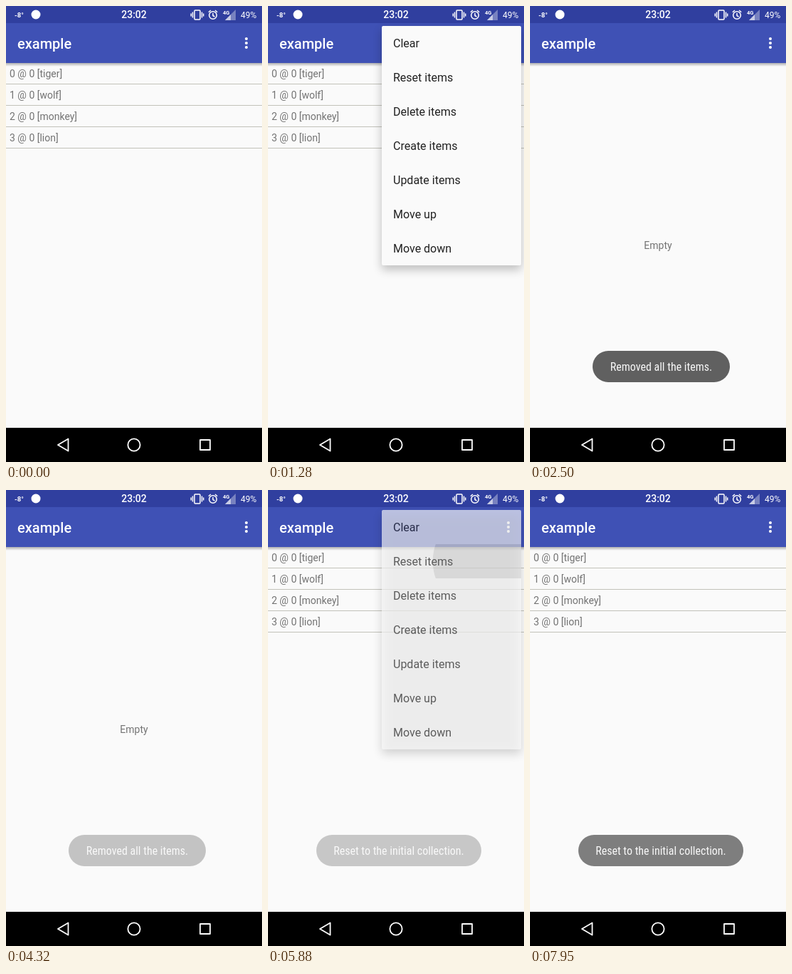
Write an HTML page that moves like this. It is 360 px wide and 640 px high and loops after 7.99 s.

```html
<!DOCTYPE html>
<html lang="en">
<head>
<meta charset="utf-8">
<title>List menu demo</title>
<style>
html, body { margin: 0; width: 100%; height: 100%; overflow: hidden; background: #000; }
#stage { display: block; width: 100%; height: 100%; }
text { font-family: Roboto, sans-serif; }
.toast text { font: 16px "Roboto Condensed", Roboto, sans-serif; text-anchor: middle; fill: #f8f8f8; }
</style>
</head>
<body>
<svg id="stage" viewBox="0 0 360 640">
  <defs>
    <filter id="soft" filterUnits="userSpaceOnUse" x="120" y="0" width="240" height="420">
      <feGaussianBlur stdDeviation="7"/>
    </filter>
    <linearGradient id="edge" x1="0" y1="0" x2="0" y2="1">
      <stop offset="0" stop-opacity=".3"/>
      <stop offset="1" stop-opacity="0"/>
    </linearGradient>
    <clipPath id="reveal"><rect id="window" rx="2"/></clipPath>
  </defs>

  <rect width="360" height="640" fill="#fafafa"/>
  <g id="list" font-size="14" fill="#737373"></g>
  <text id="empty" x="180" y="341" font-size="14" text-anchor="middle" fill="#737373">Empty</text>

  <rect y="80" width="360" height="5" fill="url(#edge)"/>
  <rect y="24" width="360" height="56" fill="#3f51b5"/>
  <text x="16" y="60" font-size="20" font-weight="500" fill="#fff">example</text>
  <circle id="press" cx="338" cy="52" fill="#fff"/>
  <g fill="#fff">
    <circle cx="338" cy="46" r="2"/><circle cx="338" cy="52" r="2"/><circle cx="338" cy="58" r="2"/>
  </g>

  <rect width="360" height="24" fill="#303f9f"/>
  <g fill="#fff">
    <text x="12" y="16" font-size="9.5" font-weight="700">-8°</text>
    <circle cx="42" cy="12" r="6.5"/>
    <text x="180" y="17" font-size="14" font-weight="500" text-anchor="middle">23:02</text>
    <text x="305" y="12" font-size="7.5" font-weight="700">4G</text>
    <text x="330" y="17" font-size="12">49%</text>
    <path d="M308 20L323 5V20Z" fill-opacity=".35"/>
    <path d="M308 20L316 12V20Z" fill-opacity=".6"/>
  </g>
  <g fill="none" stroke="#fff" stroke-width="1.5">
    <rect x="265" y="6" width="8" height="13" rx="1"/>
    <path d="M262.5 8.5V16.5M260.3 10.5V14.5M275.5 8.5V16.5M277.7 10.5V14.5"/>
    <circle cx="291" cy="13" r="5.3"/>
    <path d="M291 10V13.5L293.5 15M284.8 8.7L288 6M297.2 8.7L294 6"/>
  </g>

  <g id="toasts"></g>

  <rect id="shadow" filter="url(#soft)"/>
  <g id="menu" clip-path="url(#reveal)">
    <g id="content">
      <rect x="160" y="28" width="196" height="336" fill="#fafafa"/>
      <svg id="row" x="160" width="196" height="48"><circle id="ripple" cy="24"/></svg>
      <g id="items" font-size="16" fill="#212121"></g>
    </g>
  </g>

  <rect y="592" width="360" height="48"/>
  <g fill="none" stroke="#fff" stroke-width="1.8" stroke-linejoin="round">
    <path d="M87.5 607.5V624.5L73 616Z"/>
    <circle cx="180" cy="616" r="8.6"/>
    <rect x="273" y="609" width="14" height="14"/>
  </g>
</svg>
<script>
const LOOP = 7990;
const BUTTON = { x: 320, y: 34, width: 36, height: 36 };
const PANEL = { x: 160, y: 28, width: 196, height: 336 };

const $ = id => document.getElementById(id);
const set = (id, attrs) => {
  for (const name in attrs) $(id).setAttribute(name, attrs[name]);
};
const show = (id, opacity) => set(id, { opacity, visibility: opacity > 0 ? "visible" : "hidden" });
const mix = (a, b, p) => a + (b - a) * p;
const progress = (t, start, length) => Math.max(0, Math.min(1, (t - start) / length));
const easeOut = p => 1 - (1 - p) ** 2;

// Material standard curve: cubic-bezier(.4, 0, .2, 1).
function standard(p) {
  let low = 0, high = 1, s = p;
  for (let i = 0; i < 16; i++) {
    s = (low + high) / 2;
    const x = 1.2 * s * (1 - s) ** 2 + 0.6 * s * s * (1 - s) + s ** 3;
    if (x < p) low = s; else high = s;
  }
  return p >= 1 ? 1 : 3 * s * s * (1 - s) + s ** 3;
}

$("list").innerHTML = ["tiger", "wolf", "monkey", "lion"].map((name, i) =>
  `<text x="5" y="${100 + 30 * i}">${i} @ 0 [${name}]</text>
   <rect y="${109 + 30 * i}" width="360" height="1" fill="#c2c2ba"/>`).join("");

$("items").innerHTML =
  ["Clear", "Reset items", "Delete items", "Create items", "Update items", "Move up", "Move down"]
    .map((label, i) => `<text x="176" y="${58 + 48 * i}">${label}</text>`).join("");

const toasts = [
  { id: "removed", label: "Removed all the items.", x: 88, width: 193, from: 1990, to: 3870, fade: 560 },
  { id: "reset", label: "Reset to the initial collection.", x: 68, width: 232, from: 5790, to: 7715, fade: 530 }
];
$("toasts").innerHTML = toasts.map(({ id, label, x, width }) =>
  `<g id="${id}" class="toast"><rect x="${x}" y="484" width="${width}" height="44" rx="22" fill="#606060"/>
   <text x="${x + width / 2}" y="512">${label}</text></g>`).join("");

// Without a condensed face, use the regular one at a smaller size.
if (document.querySelector("#reset text").getComputedTextLength() > 192)
  document.querySelectorAll(".toast text").forEach(el => el.style.fontSize = "14px");

const visits = [
  { tap: 500, open: 960, row: 0, pick: 1720, close: 2010 },
  { tap: 4760, open: 4830, row: 1, pick: 5620, close: 5800 }
];

// The menu grows out of its button while its content slides into place.
function drawMenu(t, { open, close, row, pick }) {
  const grown = standard(progress(t, open, 300));
  const frame = {};
  for (const side in PANEL) frame[side] = mix(BUTTON[side], PANEL[side], grown);
  set("window", frame);
  set("shadow", { ...frame, y: frame.y + 6 });

  const dx = frame.x + frame.width / 2 - PANEL.x - PANEL.width / 2;
  const dy = frame.y + frame.height / 2 - PANEL.y - PANEL.height / 2;
  set("content", { transform: `translate(${dx} ${dy})` });

  const alpha = progress(t, open, 120) * (1 - progress(t, close, 240));
  show("menu", alpha);
  show("shadow", 0.24 * alpha);

  const spread = progress(t, pick, 400);
  set("row", { y: 28 + 48 * row });
  set("ripple", { cx: 150 - 10 * spread, r: 110 * spread, opacity: 0.12 * progress(t, pick, 80) });
}

function draw(t) {
  const visit = visits[t < 4000 ? 0 : 1];
  drawMenu(t, visit);

  show("press", 0.22 * progress(t, visit.tap, 120) * (1 - progress(t, visit.open, 250)));
  set("press", { r: mix(8, 24, easeOut(progress(t, visit.tap, 300))) });

  const empty = t >= 1990 && t < 5790;
  show("empty", empty ? 1 : 0);
  show("list", empty ? 0 : 1);

  for (const { id, from, to, fade } of toasts)
    show(id, easeOut(progress(t, from, 510)) * (1 - progress(t, to, fade) ** 2));
}

const began = performance.now();
function tick() {
  draw((performance.now() - began) % LOOP);
  requestAnimationFrame(tick);
}
tick();
</script>
</body>
</html>
```
